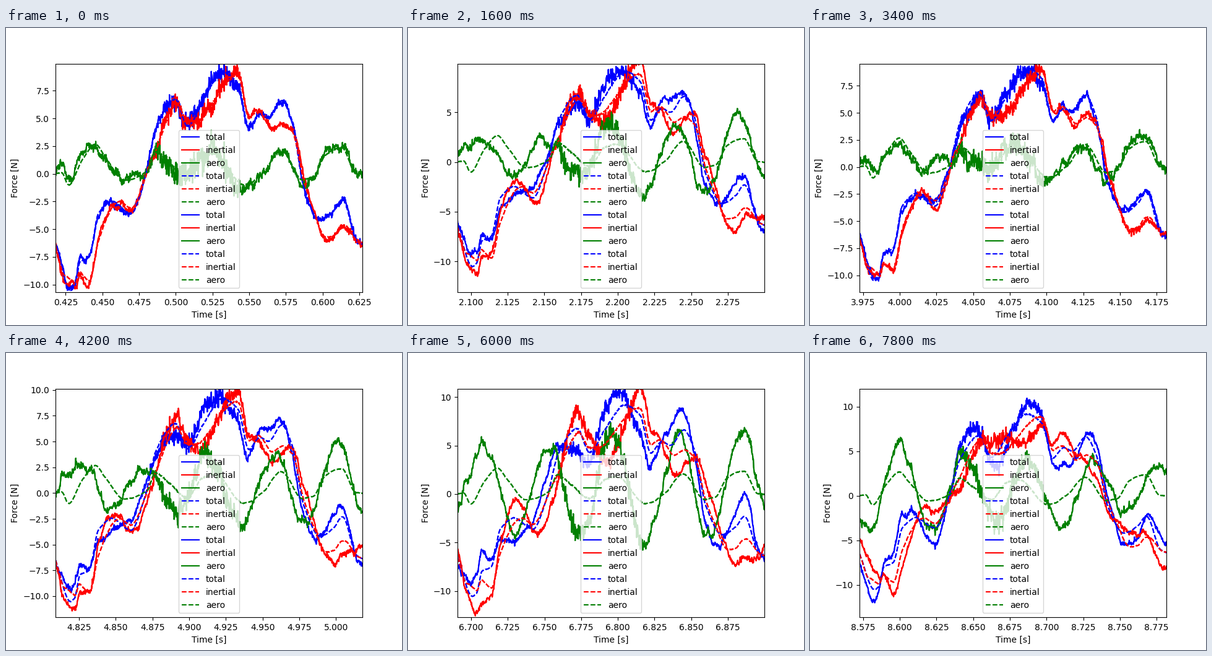
Recreate the animation shown at these times as a matplotlib script. Size 640 by 480 pixels, loop 8 s.

```python
import numpy as np
import matplotlib.pyplot as plt
from matplotlib.animation import FuncAnimation

FRAMES, INTERVAL = 40, 200
PERIOD = 0.20909          # seconds of one wing beat, one beat per frame
OFFSET = 0.000126
SAMPLES = 1000
SWING = 0.2157            # length of one aero swing, as a share of the beat
COLORS = ("blue", "red", "green")
NAMES = ("total", "inertial", "aero")

phase = np.linspace(0, 1, SAMPLES)


def curve(points):
    """Smooth curve through (percent of beat, force) without overshoot."""
    x, y = np.array(points, float).T
    h, rise = np.diff(x), np.diff(y) / np.diff(x)
    m = np.zeros(len(x))
    a, b = rise[:-1], rise[1:]
    same = a * b > 0
    m[1:-1][same] = 2 * (a * b)[same] / (a + b)[same]
    m[0], m[-1] = rise[0], rise[-1]
    u = phase * 100
    i = np.clip(np.searchsorted(x, u, "right") - 1, 0, len(h) - 1)
    f = (u - x[i]) / h[i]
    bend = f**2 * (3 - 2 * f)
    return (y[i] + bend * (y[i + 1] - y[i])
            + h[i] * f * (1 - f) * ((1 - f) * m[i] - f * m[i + 1]))


mean_total = curve([
    (0, -6.5), (4.8, -10.5), (6.2, -10.2), (8, -7.9), (11, -7.5), (14, -3.6),
    (18.5, -2.5), (24.6, -3.6), (29, -0.5), (33, 4.3), (39, 6.7), (43, 4.3),
    (48, 6.6), (54.5, 9.2), (59.5, 8.1), (63, 4.2), (66.5, 5.4), (69.5, 5),
    (73.7, 6.6), (77, 4.7), (81, -1.3), (86.3, -4.2), (90.5, -3.4),
    (93.5, -2.3), (98, -6), (100, -6.4)])
mean_aero = curve([
    (0, 0), (2, 0.1), (4.3, -1), (9, 1.4), (13, 2.7), (16, 1.6),
    (22.5, -0.6), (30, 0.3), (32.5, 2), (37, 1), (43, -0.5), (48, 1.5),
    (52, 1.8), (61.3, -1), (68, 0.2), (73.5, 2.1), (80.5, -0.5), (84, -0.3),
    (88, 1.7), (93.3, 2.35), (98, 0), (100, 0)])

# beat number, swing strength, first swing peak, lower and upper limit
TREND = np.array([
    (0, 0.4, 0.05, -10.70, 9.95),
    (4, 2.5, 0.03, -13.40, 9.59),
    (12, 2.0, 0.07, -12.86, 10.24),
    (17, 0.7, 0.04, -11.58, 9.54),
    (25, 4.0, 0.07, -12.53, 10.72),
    (35, 4.8, 0.07, -12.85, 10.99),
    (39, 3.1, 0.13, -13.62, 12.01)])


def smooth_noise(rng, width):
    raw = rng.normal(0, 1, SAMPLES + width - 1)
    return np.convolve(raw, np.ones(width), "valid") / np.sqrt(width)


def ripple(rng, size=1.0):
    """Sensor noise, strongest in the middle of the beat."""
    middle = 0.5 * (np.tanh((phase - 0.33) / 0.024)
                    - np.tanh((phase - 0.60) / 0.024))
    white = (0.11 + 0.27 * middle) * rng.normal(0, 1, SAMPLES)
    return size * (white + 0.17 * smooth_noise(rng, 14)
                   + 0.15 * smooth_noise(rng, 40))


quiet = np.random.default_rng(5)
mean_total += ripple(quiet, 0.1)
mean_aero += ripple(quiet, 0.1)
means = (mean_total, mean_total - mean_aero, mean_aero)


def forces(n):
    """Limits and the three measured curves of beat n."""
    strength, peak, low, high = (np.interp(n, TREND[:, 0], column)
                                 for column in TREND.T[1:])
    rng = np.random.default_rng(100 + n)
    swing = strength * np.cos(2 * np.pi * (phase - peak) / SWING)
    # the swing pushes total and inertial force apart by equal shares
    total = means[0] + swing / 2 + ripple(rng)
    inertial = means[1] - swing / 2 + ripple(rng)
    return (low, high), (total, inertial, total - inertial)


fig, ax = plt.subplots(figsize=(6.4, 4.8), dpi=100)
solid, dashed = [], []
for _ in range(2):
    for group, style in ((solid, "-"), (dashed, "--")):
        for name, color in zip(NAMES, COLORS):
            group += ax.plot([], [], style, color=color, label=name)
ax.set_xlabel("Time [s]")
ax.set_ylabel("Force [N]")
ax.legend(loc="lower center")


def draw(n):
    start = (n + 2) * PERIOD - OFFSET
    t = start + phase * PERIOD
    limits, measured = forces(n)
    for i in range(6):
        solid[i].set_data(t, measured[i % 3])
        dashed[i].set_data(t, means[i % 3])
    ax.set_xlim(start, start + PERIOD)
    ax.set_ylim(*limits)
    return solid + dashed


anim = FuncAnimation(fig, draw, frames=FRAMES, init_func=lambda: draw(0),
                     interval=INTERVAL, repeat=True, repeat_delay=0)
plt.show()
```
